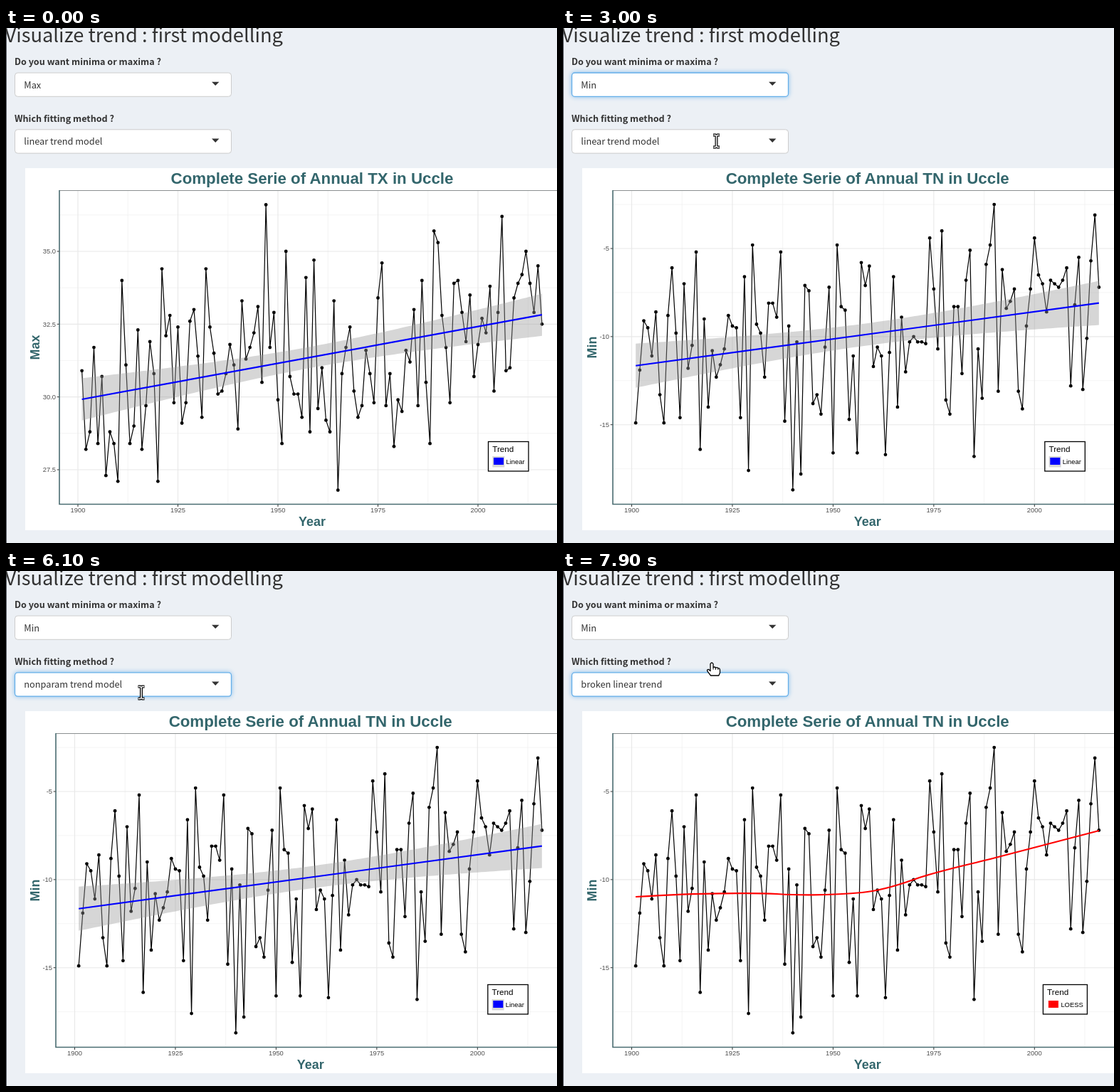
An HTML page that plays this animation: 774x724 px, repeating every 8000 ms.

```html
<!DOCTYPE html>
<html lang="en">
<head>
<meta charset="utf-8">
<title>Visualize trend</title>
<style>
  html, body { margin: 0; width: 100%; height: 100%; overflow: hidden; background: #ecf0f5; }
  svg { display: block; }
  text { white-space: pre; }
  .ui { font: 12.75px "Noto Sans CJK JP", "Noto Sans CJK SC", "Noto Sans CJK", "Source Sans Pro", sans-serif; fill: #333; }
  .label { font-size: 12.6px; font-weight: 700; }
  .heading { font-size: 27.3px; }
  .plot { font-family: "Liberation Sans", Arial, sans-serif; }
  .title { font-size: 22.3px; font-weight: 700; fill: #33666c; text-anchor: middle; }
  .axis { font-size: 17.9px; }
  .tick { font-size: 9.4px; fill: #4d4d4d; }
  .menu { filter: drop-shadow(0 4px 5px rgba(0, 0, 0, .2)); }
  .focus { filter: drop-shadow(0 0 3px rgba(102, 175, 233, .75)); }
</style>
</head>
<body>
<svg id="stage" width="774" height="724" viewBox="0 0 774 724"></svg>
<script>
const LOOP = 8000, STEP = 100, ROW = 26.5, FIRST_YEAR = 1901;

// Yearly extremes in tenths of a degree, from 1901 on
const maxima = [
  309, 282, 288, 317, 284, 307, 273, 288, 284, 271, 340, 311, 284, 290, 323, 282, 297, 319, 308, 271,
  344, 321, 328, 298, 324, 291, 298, 326, 330, 314, 293, 344, 324, 315, 301, 302, 308, 318, 311, 289,
  333, 313, 317, 322, 331, 305, 366, 317, 329, 299, 284, 350, 307, 301, 301, 293, 341, 288, 347, 296,
  310, 292, 288, 333, 268, 308, 317, 324, 302, 293, 297, 316, 308, 298, 334, 346, 297, 308, 283, 299,
  295, 316, 312, 330, 297, 340, 305, 284, 357, 353, 328, 317, 298, 339, 340, 329, 319, 335, 307, 318,
  327, 322, 338, 302, 329, 362, 309, 310, 334, 339, 342, 350, 339, 329, 345, 325];
const minima = [
  149, 119, 91, 95, 111, 86, 133, 149, 88, 61, 98, 146, 70, 118, 105, 52, 164, 90, 140, 108,
  123, 116, 107, 88, 94, 95, 146, 66, 176, 48, 93, 98, 123, 81, 81, 89, 52, 148, 94, 187,
  103, 178, 71, 74, 138, 133, 144, 106, 72, 166, 48, 83, 85, 147, 111, 166, 58, 71, 60, 117,
  106, 111, 167, 109, 66, 140, 89, 120, 103, 100, 103, 103, 104, 44, 73, 107, 40, 136, 144, 83,
  83, 121, 68, 51, 168, 107, 135, 59, 48, 25, 131, 62, 84, 80, 73, 131, 141, 94, 73, 44,
  65, 70, 86, 68, 70, 72, 68, 61, 128, 82, 55, 130, 101, 57, 31, 72].map(v => -v);

const charts = {
  Max: { data: maxima, left: 75, x0: 101, dx: 5.62, y0: 314, top: 35, dy: 40.93, step: 2.5,
         ticks: [35, 32.5, 30, 27.5], digits: 1, code: 'TX', mid: 430, legend: 677.5 },
  Min: { data: minima, left: 70, x0: 96.5, dx: 5.658, y0: 310, top: -5, dy: 24.77, step: 5,
         ticks: [-5, -10, -15], digits: 0, code: 'TN', mid: 427.7, legend: 676.8 }
};
const kinds = ['Max', 'Min'];
const methods = ['linear trend model', 'nonparam trend model', 'broken linear trend',
  'broken linear + linear trend', 'All 3 methods together'];

const text = (x, y, cls, s, extra = '') => `<text x="${x}" y="${y}" class="${cls}" ${extra}>${s}</text>`;
const rect = (x, y, w, h, fill, extra = '') =>
  `<rect x="${x}" y="${y}" width="${w}" height="${h}" fill="${fill}" ${extra}/>`;
const path = (d, stroke, width, extra = '') =>
  `<path d="${d}" fill="none" stroke="${stroke}" stroke-width="${width}" ${extra}/>`;
const join = pts => pts.map(p => p.map(n => n.toFixed(2)).join(' ')).join('L');
const sum = a => a.reduce((s, v) => s + v, 0);

// Least squares line with its 95% confidence band
function linearFit(values) {
  const n = values.length, mid = (n - 1) / 2, mean = sum(values) / n;
  const sxx = sum(values.map((_, i) => (i - mid) ** 2));
  const slope = sum(values.map((v, i) => (i - mid) * v)) / sxx;
  const at = i => mean + slope * (i - mid);
  const dev = Math.sqrt(sum(values.map((v, i) => (v - at(i)) ** 2)) / (n - 2));
  const band = i => 1.981 * dev * Math.sqrt(1 / n + (i - mid) ** 2 / sxx);
  return { at, band };
}

function legend(x, w, color, name, banded) {
  return rect(x, 581.5, w, 41.5, '#fff', 'stroke="#000" stroke-width="1.3"') +
    text(x + 5.7, 595.7, 'plot', 'Trend', 'font-size="11.7"') +
    (banded ? rect(x + 5.8, 602, 17, 15.5, '#d6d6d6') : '') +
    rect(x + 7.5, 604, 14, 10, color) +
    text(x + 25, 612.6, 'plot', name, 'font-size="9.4"');
}

function linearTrend(c, X, Y) {
  const fit = linearFit(c.data.map(v => v / 10));
  const edge = sign => c.data.map((_, i) => [X(FIRST_YEAR + i), Y(fit.at(i) + sign * fit.band(i))]);
  const last = c.data.length - 1;
  const ends = [0, last].map(i => [X(FIRST_YEAR + i), Y(fit.at(i))]);
  return `<path d="M${join([...edge(1), ...edge(-1).reverse()])}Z" fill="#999" fill-opacity=".4"/>` +
    path('M' + join(ends), '#00f', 2.2) + legend(c.legend, 56.5, '#00f', 'Linear', true);
}

const loessTrend = () =>
  path('M102 458C150 455 180 453.5 220 453.3S275 452.5 300 454S330 455.6 350 455.4' +
    'S400 454 420 452S460 445.5 492 434S560 415 600 405L753 365', '#f00', 2.2) +
  legend(674.4, 62, '#f00', 'LOESS');

function chart(kind, method) {
  const c = charts[kind];
  const X = year => c.x0 + (year - 1900) * c.dx;
  const Y = v => c.y0 + (c.top - v) * c.dy;
  const years = [1900, 1925, 1950, 1975, 2000];
  const hline = (v, color, w) => path(`M${c.left} ${Y(v)}H774`, color, w);
  const vline = (year, color, w) => path(`M${X(year)} 228V669`, color, w);
  const half = c.step / 2;
  const pts = c.data.map((v, i) => [X(FIRST_YEAR + i), Y(v / 10)]);

  return rect(27, 197, 747, 509, '#fff') +
    [c.top + half, ...c.ticks.map(v => v - half)].filter(v => Y(v) < 669)
      .map(v => hline(v, '#f0f0f0', .7)).join('') +
    years.map(y => vline(y + 12.5, '#f0f0f0', .7)).join('') +
    c.ticks.map(v => hline(v, '#e8e8e8', 1.1)).join('') +
    years.map(y => vline(y, '#e8e8e8', 1.1)).join('') +
    path('M' + join(pts), '#000', 1.2, 'stroke-linejoin="round"') +
    pts.map(([x, y]) => `<circle cx="${x.toFixed(2)}" cy="${y.toFixed(2)}" r="2.4"/>`).join('') +
    (method ? loessTrend() : linearTrend(c, X, Y)) +
    path(`M${c.left} 228.5H774`, '#8a8f90', 1.1) +
    path(`M${c.left} 228V669.5H774`, '#4a6c71', 1.6) +
    c.ticks.map(v => path(`M${c.left - 3.3} ${Y(v)}h3`, '#333', 1) +
      text(c.left - 5, Y(v) + 3.4, 'plot tick', v.toFixed(c.digits), 'text-anchor="end"')).join('') +
    years.map(y => path(`M${X(y)} 670v3`, '#333', 1) +
      text(X(y), 681.2, 'plot tick', y, 'text-anchor="middle"')).join('') +
    text(c.mid, 219, 'plot title', `Complete Serie of Annual ${c.code} in Uccle`) +
    text(c.mid, 700, 'plot title axis', 'Year') +
    text(0, 0, 'plot title axis', kind, 'transform="translate(46.5 449) rotate(-90)"');
}

function select(y, value, { focus, open, caret }) {
  const tri = open ? 'M289 17.5h10.4l-5.2-5.3z' : 'M289 13.3h10.4l-5.2 5.3z';
  return `<g transform="translate(0 ${y})">` +
    rect(12.5, .5, 304, 33.3, '#fff', `rx="4" stroke="${focus ? '#66afe9' : '#ccc'}"
      stroke-width="${focus ? 1.3 : 1}" class="${focus ? 'focus' : ''}"`) +
    text(25.3, 22, 'ui', value, caret ? 'id="typed"' : '') +
    (caret ? '<path id="caret" stroke="#222" d="M0 7.5v19"/>' : '') +
    `<path d="${tri}" fill="#333"/></g>`;
}

function menu(y, items, chosen, pointerY) {
  const top = y + 5.3, over = Math.floor((pointerY - top) / ROW);
  const active = over >= 0 && over < items.length ? over : chosen;
  return rect(12.5, y, 304, items.length * ROW + 10.5, '#fff', 'rx="4" stroke="#c8c8c8" class="menu"') +
    rect(13, top + active * ROW, 303, ROW, '#f5f5f5') +
    items.map((s, i) => text(25.3, top + i * ROW + 18.4, 'ui', s)).join('');
}

const cursors = {
  arrow: '<path d="M0 0V18.2L4.3 14.3L7.2 21.2L10.5 19.8L7.5 13.2H13.3Z" fill="#fff" stroke="#000" stroke-width="1.3"/>',
  beam: path('M-4.5-8.5H-1.5L0-7.5L1.5-8.5H4.5M0-7.5V7.5M-4.5 8.5H-1.5L0 7.5L1.5 8.5H4.5', '#000', 4) +
    path('M-4-8.5H-1.5L0-7.5L1.5-8.5H4M0-7.5V7.5M-4 8.5H-1.5L0 7.5L1.5 8.5H4', '#fff', 1.5),
  hand: `<path d="M-2 1.5Q0-1.5 2 1.5V6.5Q4 5.3 5.5 7Q7.5 6 8.8 7.7Q11.5 7.2 11.5 10.5V14
    L9.8 18H-1.5L-6.3 11.7Q-6.8 9 -4.3 9.4L-2 11.5Z" fill="#fff" stroke="#000" stroke-width="1.3" stroke-linejoin="round"/>` +
    path('M2 6.5V9.5M5.5 7V9.8M8.8 7.7V10', '#000', 1)
};

// time, x, y, shape until the next key
const moves = [
  [400, 337, -4, 'arrow'], [800, 296, 62, 'arrow'], [900, 284, 76, 'beam'], [1100, 270, 82, 'beam'],
  [1300, 272, 78, 'beam'], [1500, 272, 78, 'beam'], [1700, 263, 104, 'arrow'], [2100, 253, 149, 'arrow'],
  [2200, 255, 150, 'hand'], [2700, 255, 150, 'hand'], [2900, 226, 156, 'beam'], [3200, 194.5, 165, 'beam'],
  [5000, 194.5, 165, 'beam'], [5200, 189, 192, 'arrow'], [5400, 183, 223, 'arrow'], [5600, 182.5, 225, 'arrow'],
  [5800, 182.5, 225, 'arrow'], [6000, 188, 182, 'beam'], [6200, 192, 160, 'beam'], [6900, 192, 160, 'beam'],
  [7100, 182, 196, 'arrow'], [7400, 170, 252, 'arrow'], [7800, 170, 252, 'arrow'],
  [7900, 209, 129, 'hand'], [LOOP, 209, 129, 'hand']];

function pointer(t) {
  const i = moves.findIndex(m => m[0] > t) - 1;
  if (i < 0) return null;
  const [t0, x0, y0, shape] = moves[i], [t1, x1, y1] = moves[i + 1];
  const k = (t - t0) / (t1 - t0);
  return { x: x0 + (x1 - x0) * k, y: y0 + (y1 - y0) * k, shape };
}

const stage = document.getElementById('stage');
stage.innerHTML = '<g id="views"></g>' + path('M.5 0V724', '#5a5f66', 1) +
  text(389, 20.3, 'ui heading', 'Visualize trend : first modelling', 'text-anchor="end"') +
  text(12, 52, 'ui label', 'Do you want minima or maxima ?') +
  text(12, 132, 'ui label', 'Which fitting method ?') + '<g id="controls"></g>';
const views = document.getElementById('views');
const controls = document.getElementById('controls');
views.innerHTML = [['Max', 0], ['Min', 0], ['Min', 1]].map(v => `<g>${chart(...v)}</g>`).join('');

function draw(t) {
  const during = (a, b) => t >= a && t < b;
  const view = t < 3000 ? 0 : t < 6400 ? 1 : 2;
  [...views.children].forEach((g, i) => g.style.display = i === view ? '' : 'none');

  const kind = t < 2400 ? 0 : 1;
  const method = t < 5800 ? 0 : t < 7600 ? 1 : 2;
  const kindOpen = during(1400, 2400);
  const methodOpen = during(4700, 5800) || during(6900, 7600);
  const p = pointer(t);

  controls.innerHTML =
    select(62.5, kinds[kind], { focus: during(1400, 4600), open: kindOpen, caret: during(1400, 1900) }) +
    select(142.3, methods[method], { focus: t >= 4700, open: methodOpen, caret: during(4600, 5100) }) +
    (kindOpen ? menu(99.5, kinds, kind, p.y) : '') +
    (methodOpen ? menu(179.5, methods, method, p.y) : '') +
    (p ? `<g transform="translate(${p.x} ${p.y})">${cursors[p.shape]}</g>` : '');

  const typed = document.getElementById('typed');
  if (typed) {
    const end = 25.3 + typed.getComputedTextLength();
    document.getElementById('caret').setAttribute('transform', `translate(${end} 0)`);
  }
}

let shown = -1;
const start = performance.now();
function tick() {
  const t = Math.floor((performance.now() - start) % LOOP / STEP) * STEP;
  if (t !== shown) draw(shown = t);
  requestAnimationFrame(tick);
}
tick();
</script>
</body>
</html>
```
